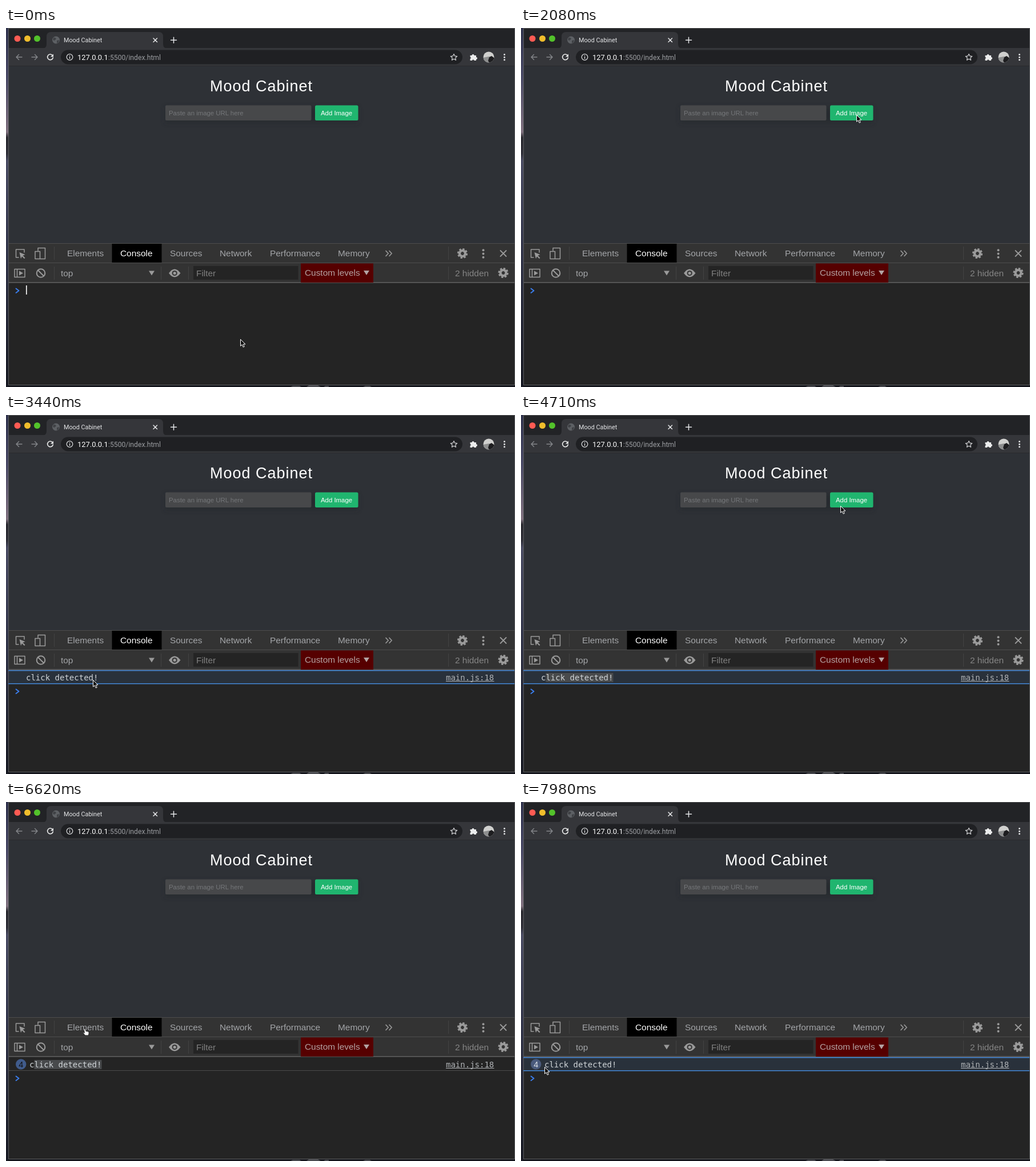
Animation of 891 by 629 pixels, one loop 8 s. Source, as an HTML page:

```html
<!DOCTYPE html>
<html lang="en">
<head>
<meta charset="utf-8">
<title>Mood Cabinet</title>
<style>
  html, body { margin: 0; width: 100%; height: 100%; overflow: hidden; background: #242424; }
  svg { display: block; width: 891px; height: 629px; }
  text { font: 15.4px "Liberation Sans", Arial, sans-serif; white-space: pre; }
  .chrome { font-family: Roboto, "Open Sans", sans-serif; }
  .small { font-size: 11.4px; }
  .mono { font: 14px "DejaVu Sans Mono", monospace; }
  .line { fill: none; stroke-linecap: round; stroke-linejoin: round; }
</style>
</head>
<body>
<svg viewBox="0 0 891 629" xmlns="http://www.w3.org/2000/svg">
  <defs>
    <linearGradient id="wall" x2="0" y2="1">
      <stop offset="0" stop-color="#30334d"/>
      <stop offset=".14" stop-color="#4a4a66"/>
      <stop offset=".29" stop-color="#80717f"/>
      <stop offset=".305" stop-color="#2a2a30"/>
      <stop offset=".35" stop-color="#303039"/>
      <stop offset=".37" stop-color="#4a4c63"/>
      <stop offset=".6" stop-color="#34374c"/>
      <stop offset="1" stop-color="#171922"/>
    </linearGradient>
    <filter id="soft" x="-10%" y="-60%" width="120%" height="220%"><feGaussianBlur stdDeviation="4"/></filter>
    <clipPath id="face"><circle cx="845" cy="51" r="9.5"/></clipPath>
    <g id="gear" fill="none" stroke="#9a9a9a">
      <circle r="7.6" stroke-width="3" stroke-dasharray="3.4 2.57"/>
      <circle r="5" stroke-width="4.2"/>
    </g>
    <g id="dots"><circle r="1"/><circle r="1" cy="3.1"/><circle r="1" cy="6.2"/></g>
  </defs>

  <!-- desktop and window -->
  <rect width="891" height="629" fill="#15161c"/>
  <rect width="4" height="629" fill="url(#wall)"/>
  <rect x="4" width="887" height="626" fill="#5c5d5f"/>
  <rect x="5" y="1" width="885" height="624" fill="#222326"/>
  <path d="M498 629l4-2h12l3 2zM526 629l4-3h16l5 3zM556 629l3-2h6v2zM625 629l4-2h8l3 2z" fill="#4c4d52"/>

  <!-- tab strip -->
  <circle cx="20" cy="18.500" r="5.500" fill="#ff5b53"/>
  <circle cx="37.500" cy="18.500" r="5.500" fill="#f0bd2c"/>
  <circle cx="54.500" cy="18.500" r="5.500" fill="#53c22b"/>
  <path d="M63 36q8 0 8-8V15q0-8 8-8H267q8 0 8 8v13q0 8 8 8z" fill="#35363a"/>
  <circle cx="87.500" cy="21" r="6.500" fill="#5d6064"/>
  <path d="M83 17q4-1 5 2l-3 3-3-1zM89 22l4-1-1 4-3 2z" fill="#3f4145"/>
  <text class="chrome" x="101" y="25" style="font-size:10.8px" fill="#e4e5e7">Mood Cabinet</text>
  <path class="line" d="M258 18l6.500 6.500m0-6.500L258 24.500M288.500 21.200h10m-5-5v10" stroke="#e4e5e7" stroke-width="1.500"/>

  <!-- address bar -->
  <rect x="5" y="35" width="885" height="32" fill="#35363a"/>
  <rect x="96" y="38.500" width="703" height="25" rx="12.500" fill="#1f2023"/>
  <path class="line" d="M28 51H18m4.500-4.500L18 51l4.500 4.500M45 51h10m-4.500-4.500L55 51l-4.500 4.500" stroke="#85878b" stroke-width="1.400"/>
  <path class="line" d="M81.500 48a4.900 4.900 0 1 0 .8 4" stroke="#eceded" stroke-width="1.600"/>
  <path d="M83 45.500v5h-5z" fill="#eceded"/>
  <circle cx="111.500" cy="51" r="5.300" fill="none" stroke="#d3d4d6" stroke-width="1.300"/>
  <path d="M111.500 50v4M111.500 47.700v1.400" stroke="#d3d4d6" stroke-width="1.400"/>
  <text class="chrome" x="125" y="55.500" style="font-size:12.900px" fill="#fff">127.0.0.1</text>
  <text class="chrome" x="179" y="55.500" style="font-size:12.200px" fill="#9b9da1">:5500/index.html</text>
  <path class="line" d="M784 45.500l1.700 3.600 4 .5-2.900 2.700.7 4-3.500-2-3.500 2 .7-4-2.900-2.700 4-.5z" stroke="#d3d4d6" stroke-width="1.200"/>
  <path d="M812.500 48h3a2 2 0 1 1 4 0h3.500v3a2 2 0 1 1 0 4v2h-3.500a1.800 1.800 0 0 0-3.500 0h-3.500v-3a1.900 1.900 0 0 0 0-3.500z" fill="#eceded"/>
  <g clip-path="url(#face)">
    <rect x="835" y="41" width="20" height="20" fill="#d0d0ce"/>
    <path d="M835 52l10-2 10 3v9h-20z" fill="#8d8e8e"/>
    <path d="M846 51l4-2 4 3v10h-8l-2-5z" fill="#1d1d1f"/>
  </g>
  <use href="#dots" transform="translate(872.5 46.5) scale(1.5)" fill="#e4e5e7"/>

  <!-- page -->
  <rect x="5" y="67" width="885" height="310" fill="#2e3136"/>
  <path d="M5 66.500H890" stroke="#292a2d"/>
  <text x="357" y="111" style="font-size:27px;letter-spacing:1px" fill="#fff">Mood Cabinet</text>
  <rect x="279" y="139" width="337" height="27" fill="#24272b" opacity=".55" filter="url(#soft)"/>
  <rect x="279" y="135.500" width="255.500" height="26.500" rx="2" fill="#47484a"/>
  <text class="small" x="285" y="152.500" fill="#75777a">Paste an image URL here</text>
  <rect x="541" y="135.500" width="75.500" height="26.500" rx="2.500" fill="#20b56f"/>
  <text class="small" x="551" y="152.500" fill="#fff">Add Image</text>

  <!-- developer tools -->
  <rect x="5" y="377" width="885" height="69" fill="#333"/>
  <path d="M5 377.500H890M5 411.500H890" stroke="#4d4d4d"/>
  <rect x="185.500" y="378" width="87" height="33" fill="#000"/>
  <g fill="#a3a5a8">
    <text x="107" y="400">Elements</text>
    <text x="200" y="400" fill="#fff">Console</text>
    <text x="287" y="400">Sources</text>
    <text x="374" y="400">Network</text>
    <text x="462" y="400">Performance</text>
    <text x="581" y="400">Memory</text>
    <text x="96" y="434.500">top</text>
    <text x="786" y="434.500" fill="#858585">2 hidden</text>
  </g>
  <path d="M84.500 383v23M84.500 418v23M271.500 418v23M319.500 418v23M774.500 383v23M774.500 418v23" stroke="#434343"/>
  <g class="line" stroke="#9a9a9a" stroke-width="1.500">
    <path d="M22 402h-4.500V388H32v5"/>
    <path d="M56 390v-4.500h12.500v19H60M51 391.500h8.500v13H51z"/>
    <path d="M665 390.500l4.200 4.500-4.200 4.500M671 390.500l4.200 4.500-4.200 4.500" stroke-width="1.700"/>
    <path d="M865.500 390l10 10m0-10l-10 10" stroke-width="1.800"/>
    <path d="M15 422.500h18v14H15zM19.500 422.500v14"/>
    <circle cx="61" cy="429.500" r="7.300" stroke-width="2"/>
    <path d="M56 424.500l10 10" stroke-width="2"/>
  </g>
  <g fill="#9a9a9a">
    <path d="M23.500 393l10 4-4 1.800 4 4-1.500 1.500-4-4-2 4z"/>
    <path d="M23 425.500l7 4-7 4z"/>
    <path d="M250 425.500h10l-5 8z"/>
    <path d="M285 429.500q10-14 20.500 0q-10.500 14-20.500 0z"/>
    <use href="#dots" transform="translate(835.5 389.3) scale(2)"/>
  </g>
  <circle cx="295.200" cy="429.500" r="4.600" fill="#333"/>
  <circle cx="295.200" cy="429.500" r="2.600" fill="#9a9a9a"/>
  <use href="#gear" x="799" y="395"/>
  <use href="#gear" x="870.500" y="429"/>
  <rect x="328" y="417" width="183.500" height="24" fill="#242424"/>
  <text x="333" y="435" fill="#808080">Filter</text>

  <!-- console -->
  <rect x="5" y="446" width="885" height="179" fill="#242424"/>
  <path d="M5 446H890" stroke="#626262" stroke-width="1.300"/>
  <rect x="516" y="412.500" width="127" height="33.500" fill="#560000"/>
  <text x="523" y="434" fill="#b3a3a3">Custom levels</text>
  <path d="M626 425h10l-5 8z" fill="#b3a3a3"/>
  <path id="prompt" class="line" d="M17.500 456.500l5 3.700-5 3.700" stroke="#3b7ff0" stroke-width="1.900"/>
  <rect id="caret" x="35" y="451" width="1.600" height="16" fill="#fff"/>
  <g id="log">
    <path d="M5 470.500H890" stroke="#4b4b4b"/>
    <g id="focus">
      <rect x="5" y="448" width="885" height="22.500" fill="#29313b"/>
      <path d="M4 447.700H890M4 470.700H890" stroke="#4488d8" stroke-width="1.500"/>
    </g>
    <g id="badge">
      <circle id="disc" cx="26.200" cy="459.500" r="9.200"/>
      <text id="count" x="26.300" y="464.500" text-anchor="middle" style="font-size:14.500px"></text>
    </g>
    <rect id="mark" y="452" height="16" fill="#484a4c"/>
    <text id="msg" class="mono" y="465" fill="#d0d5d8">click detected!</text>
    <text class="mono" x="770" y="465" fill="#b0b3b6">main.js:18</text>
    <path d="M770 466.500h84.500" stroke="#b0b3b6"/>
  </g>

  <g id="pointer" stroke-width="1">
    <path id="arrow" d="M.5.500V12.200L3.200 9.800 5.200 14.200 7.200 13.300 5.300 9H9z" fill="#111" stroke="#fff"/>
    <path id="hand" d="M-2.500 2q1.300-2 2.500 0l1 3.500 3.500.6q1.800.5 1.700 2.400l-.7 4.500H-.5L-4 8.500q0-1.700 2.300 0z" fill="#fff" stroke="#222"/>
  </g>
</svg>
<script>
const LOOP = 8000, CHAR = 8.43, LETTERS = 15;
const HOME = [410, 545];
const CLICKS = [2410, 5220, 5730, 6210];
const DRAG_START = 3520, DRAG_END = 3790, REFOCUS = 7560;

// pointer glides: start, end, steps, then the points passed at an even pace
const glides = [
  [120, 410, 5, [404, 528]],
  [710, 1510, 12, [470, 390], [587, 200], [583, 182]],
  [1570, 2080, 10, [577, 218], [560, 190], [611, 133], [587, 152]],
  [2650, 3230, 9, [330, 330], [139, 455], [146, 473]],
  [3440, 3440, 1, [152, 464]],
  [DRAG_START, 4150, 8, [161, 464], [44, 463], [44, 463], [448, 326]],
  [4320, 4710, 6, [545, 185], [559, 159]],
  [6390, 6620, 4, [139, 396]],
  [6680, 7120, 6, [24, 457]],
  [7200, 7380, 3, [20, 459]],
  [7500, 7740, 5, [29, 462]],
  [7980, 7980, 1, [41, 464]]
];

const $ = id => document.getElementById(id);
const show = (id, on) => $(id).setAttribute("visibility", on ? "inherit" : "hidden");
const set = (id, attrs) => { for (const k in attrs) $(id).setAttribute(k, attrs[k]); };
const within = (t, a, b) => t >= a && t < b;
const clamp = (v, lo, hi) => Math.max(lo, Math.min(hi, v));

function along(points, u) {
  const s = u * (points.length - 1);
  const i = Math.min(Math.floor(s), points.length - 2);
  return points[i].map((v, k) => v + (points[i + 1][k] - v) * (s - i));
}

function pointerAt(t) {
  let at = HOME;
  for (const [start, end, steps, ...points] of glides) {
    if (t < start) break;
    const gap = (end - start) / (steps - 1) || 1;
    const step = Math.min(steps, 1 + Math.floor((t - start) / gap + 1e-6));
    at = along([at, ...points], step / steps);
  }
  return at;
}

function draw(t) {
  const [x, y] = pointerAt(t);
  const count = CLICKS.filter(c => t >= c).length;
  const focused = within(t, 3440, 5160) || t >= REFOCUS;
  const left = count > 1 ? 41 : 35;

  set("pointer", { transform: `translate(${x.toFixed(1)} ${y.toFixed(1)})` });
  const pointing = within(t, 6600, 6680);
  show("arrow", !pointing);
  show("hand", pointing);

  show("caret", t < 1330 && !within(t, 330, 830));
  set("prompt", { transform: `translate(0 ${count ? 24 : 0})` });
  show("log", count > 0);
  show("focus", focused);
  show("badge", count > 1);
  set("disc", { fill: focused ? "#4a5a7c" : "#405b8b" });
  set("count", { fill: focused ? "#dde2e8" : "#111" });
  $("count").textContent = count;
  set("msg", { x: left });

  const from = t < DRAG_END ? clamp(Math.round((x - 35) / CHAR), 1, LETTERS) : 1;
  show("mark", within(t, DRAG_START, REFOCUS));
  set("mark", { x: left + from * CHAR, width: (LETTERS - from) * CHAR });
}

const start = performance.now();
function tick() {
  draw((performance.now() - start) % LOOP);
  requestAnimationFrame(tick);
}
tick();
</script>
</body>
</html>
```
